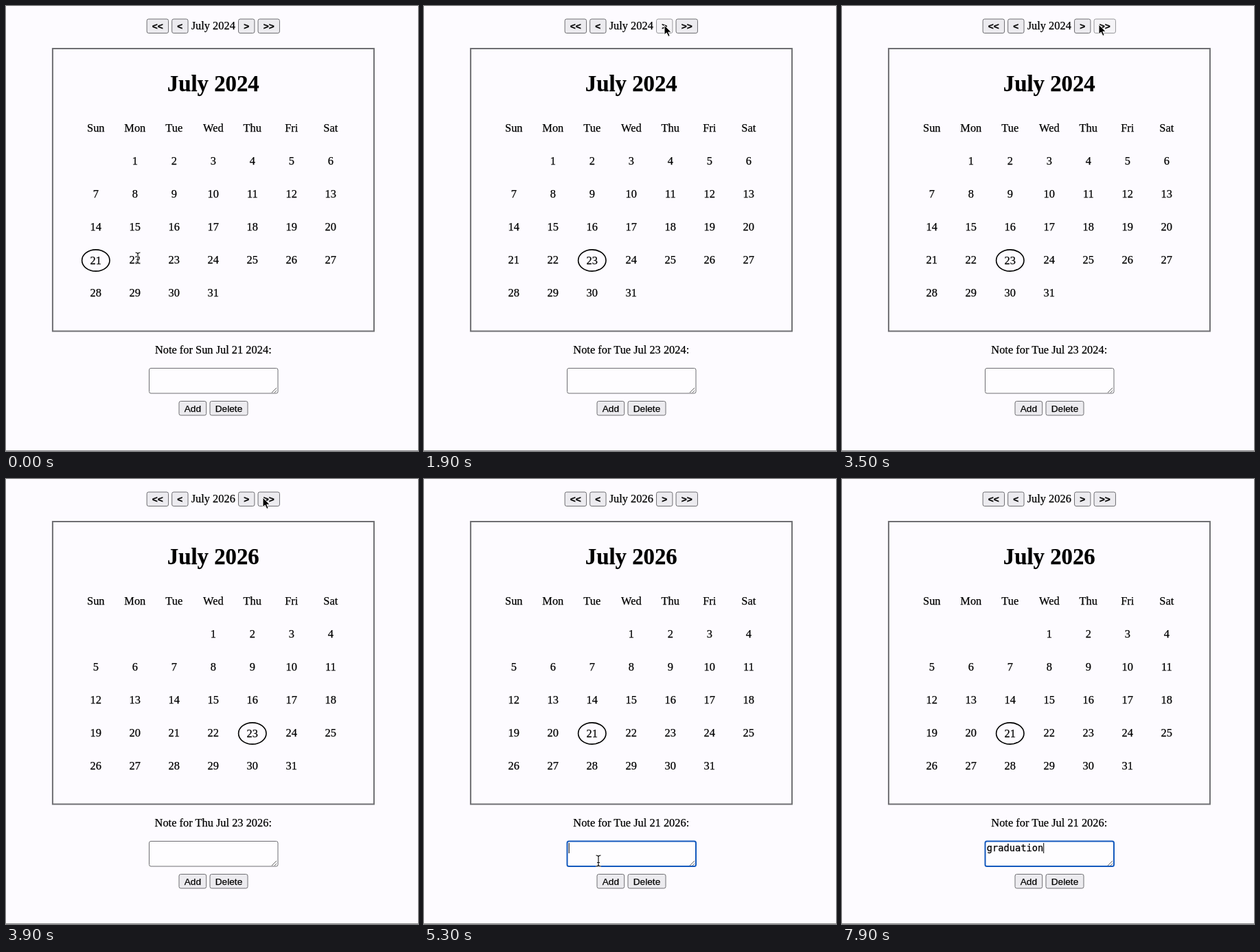
Recreate the animation shown at these times as an HTML page. Size 600 by 648 pixels, loop 8000 ms.

```html
<!DOCTYPE html>
<html lang="en">
<head>
<meta charset="utf-8">
<title>Calendar notes</title>
<style>
  html, body { margin: 0; width: 100%; height: 100%; overflow: hidden; background: #fdfbff; }
  svg { display: block; }
  text {
    font: 16.4px "Liberation Serif", "Times New Roman", serif;
    text-anchor: middle; stroke: #000; stroke-width: .25px;
  }
  .title { font-size: 32.8px; font-weight: bold; }
  .label { font: 13.7px "Liberation Sans", Arial, sans-serif; }
  .bold { font-weight: bold; }
  .typed { font: 13.7px "DejaVu Sans Mono", monospace; text-anchor: start; }
</style>
</head>
<body>
<svg id="stage" width="600" height="648" viewBox="0 0 600 648"></svg>
<script>
const LOOP = 8000, STEP = 100, MID = 301.8, GAP = 4.1;
const COL = 57, ROW = 48, HEAD_Y = 183, EDGE = '#6e6e72';
const stage = document.getElementById('stage');
const days = ['Sun', 'Mon', 'Tue', 'Wed', 'Thu', 'Fri', 'Sat'];
const shifts = { '<<': -12, '<': -1, '>': 1, '>>': 12 }; // in months

// A click picks a day, presses a header button or focuses the note
const clicks = [
  { at: 100, x: 192, y: 367, on: 22 },
  { at: 1100, x: 254, y: 366, on: 23 },
  { at: 2000, x: 350, y: 28, on: '>' },
  { at: 2700, x: 247, y: 31, on: '<' },
  { at: 3600, x: 374, y: 27, on: '>>' },
  { at: 3900, x: 374, y: 27, on: '>>' },
  { at: 4700, x: 234, y: 370, on: 21 },
  { at: 5200, x: 254, y: 556, on: 'note' }
];
const focusAt = clicks[clicks.length - 1].at;

// Bursts of typing, one key per step
const bursts = [[5900, 'grad'], [7100, 'u'], [7400, 'ati'], [7800, 'on']];
const keys = bursts.flatMap(([at, s]) => [...s].map((char, i) => ({ char, at: at + i * STEP })));

const colX = i => MID + COL * (i - 3);
const rowY = i => HEAD_Y + ROW * i;
const clamp = v => Math.min(1, Math.max(0, v));
const smooth = v => v * v * (3 - 2 * v);

function dateAt(t) {
  const date = new Date(2024, 6, 21);
  for (const { at, on } of clicks) {
    if (at > t) break;
    if (on in shifts) date.setMonth(date.getMonth() + shifts[on]);
    else if (on > 0) date.setDate(on);
  }
  return date;
}

function text(x, y, s, cls = '') {
  const safe = String(s).replace(/</g, '&lt;');
  return `<text x="${x}" y="${y}" class="${cls}">${safe}</text>`;
}

function button(x, y, w, s, pressed, cls = '') {
  return `<rect x="${x + .5}" y="${y + .5}" width="${w - 1}" height="20.5" rx="2.5"
    fill="${pressed ? '#f5f4f7' : '#ecebef'}" stroke="${pressed ? '#98989c' : EDGE}"/>` +
    text(x + w / 2, y + 15.8, s, 'label ' + cls);
}

function header(caption, pressed) {
  const half = (caption.startsWith('A') ? 84.3 : 64.3) / 2 + GAP, small = 24.4, wide = 32.4;
  const nav = (x, w, s) => button(x, 18.5, w, s, s === pressed, 'bold');
  return text(MID, 34.4, caption) +
    nav(MID - half - small, small, '<') +
    nav(MID - half - small - GAP - wide, wide, '<<') +
    nav(MID + half, small, '>') +
    nav(MID + half + small + GAP, wide, '>>');
}

function calendar(date) {
  const year = date.getFullYear(), month = date.getMonth();
  const first = new Date(year, month, 1).getDay();
  const count = new Date(year, month + 1, 0).getDate();
  let out = days.map((d, i) => text(colX(i), HEAD_Y, d)).join('');
  for (let d = 1; d <= count; d++) {
    const cell = first + d - 1, x = colX(cell % 7), y = rowY(1 + Math.floor(cell / 7));
    const selected = d === date.getDate();
    if (selected) out += `<ellipse cx="${x}" cy="${y - 4.5}" rx="20.2" ry="15.6"
      fill="none" stroke="#000" stroke-width="1.6"/>`;
    out += text(x, y + (selected ? 1 : 0), d);
  }
  return out;
}

function noteField(t) {
  const focused = t >= focusAt;
  const typed = keys.filter(k => k.at <= t);
  const lastInput = typed.length ? typed[typed.length - 1].at : focusAt;
  const caretOn = focused && (t - lastInput) % 1000 < 500;
  const caretX = 211.2 + typed.length * 8.25;
  return `<rect x="208.5" y="527.5" width="187.5" height="36.5" rx="2.5" fill="#fefdff"
      stroke="${focused ? '#1459bd' : EDGE}" stroke-width="${focused ? 2 : 1}"/>
    <path d="M387 563l7-7M391 563l3-3" stroke="#666" fill="none"/>` +
    text(210.8, 542, typed.map(k => k.char).join(''), 'typed') +
    (caretOn ? `<path d="M${caretX} 530v15" stroke="#000"/>` : '');
}

// Leaves late enough to reach the next click one step early
function pointerAt(t) {
  const to = clicks.find(c => c.at > t) || clicks[clicks.length - 1];
  const from = clicks[clicks.indexOf(to) - 1] || to;
  const arrive = to.at - STEP;
  const travel = Math.min(600, 3.2 * Math.hypot(to.x - from.x, to.y - from.y));
  const leave = Math.max(from.at + STEP, arrive - travel);
  const k = t >= arrive ? 1 : smooth(clamp((t - leave) / (arrive - leave)));
  return [from.x + (to.x - from.x) * k, from.y + (to.y - from.y) * k];
}

function overText(x, y) {
  const offset = (v, origin, size) => Math.abs(v - origin - size * Math.round((v - origin) / size));
  const inGrid = y > 165 && y < 435;
  const onDay = inGrid && offset(x, MID, COL) < 10 && offset(y, HEAD_Y - 5, ROW) < 8;
  return onDay || (x > 208 && x < 396 && y > 527 && y < 564);
}

function pointer(t) {
  if (t >= keys[0].at) return '';
  const [x, y] = pointerAt(t);
  const d = 'M-3.5-8Q-.5-8 0-6Q.5-8 3.5-8M0-6V6M-3.5 8Q-.5 8 0 6Q.5 8 3.5 8M-2 2.5H2';
  const shape = overText(x, y)
    ? `<path d="${d}" fill="none" stroke="#fff" stroke-width="2.6"/>
       <path d="${d}" fill="none" stroke="#111" stroke-width="1.2"/>`
    : `<path d="M0 0V14L3.3 11L5.8 16.5L8.2 15.4L5.8 10.2H10.2Z"
        fill="#000" stroke="#fff" stroke-width="1"/>`;
  return `<g transform="translate(${x} ${y})">${shape}</g>`;
}

function draw(t) {
  const date = dateAt(t);
  const caption = date.toLocaleString('en-US', { month: 'long' }) + ' ' + date.getFullYear();
  const pressed = clicks.find(c => t >= c.at - STEP && t < c.at);
  stage.innerHTML =
    `<rect x="67.9" y="62" width="468" height="411.5" fill="none" stroke="${EDGE}" stroke-width="2"/>
     <path d="M0 647.5H600" stroke="#858587"/>` +
    header(caption, pressed && pressed.on) +
    text(MID, 124, caption, 'title') +
    calendar(date) +
    text(MID, 506, `Note for ${date.toDateString()}:`) +
    noteField(t) +
    button(251.5, 575, 40.7, 'Add') +
    button(296.5, 575, 56, 'Delete') +
    pointer(t);
}

let last = -1;
const start = performance.now();
function tick() {
  const t = Math.floor((performance.now() - start) % LOOP / STEP) * STEP;
  if (t !== last) draw(last = t);
  requestAnimationFrame(tick);
}
tick();
</script>
</body>
</html>
```
